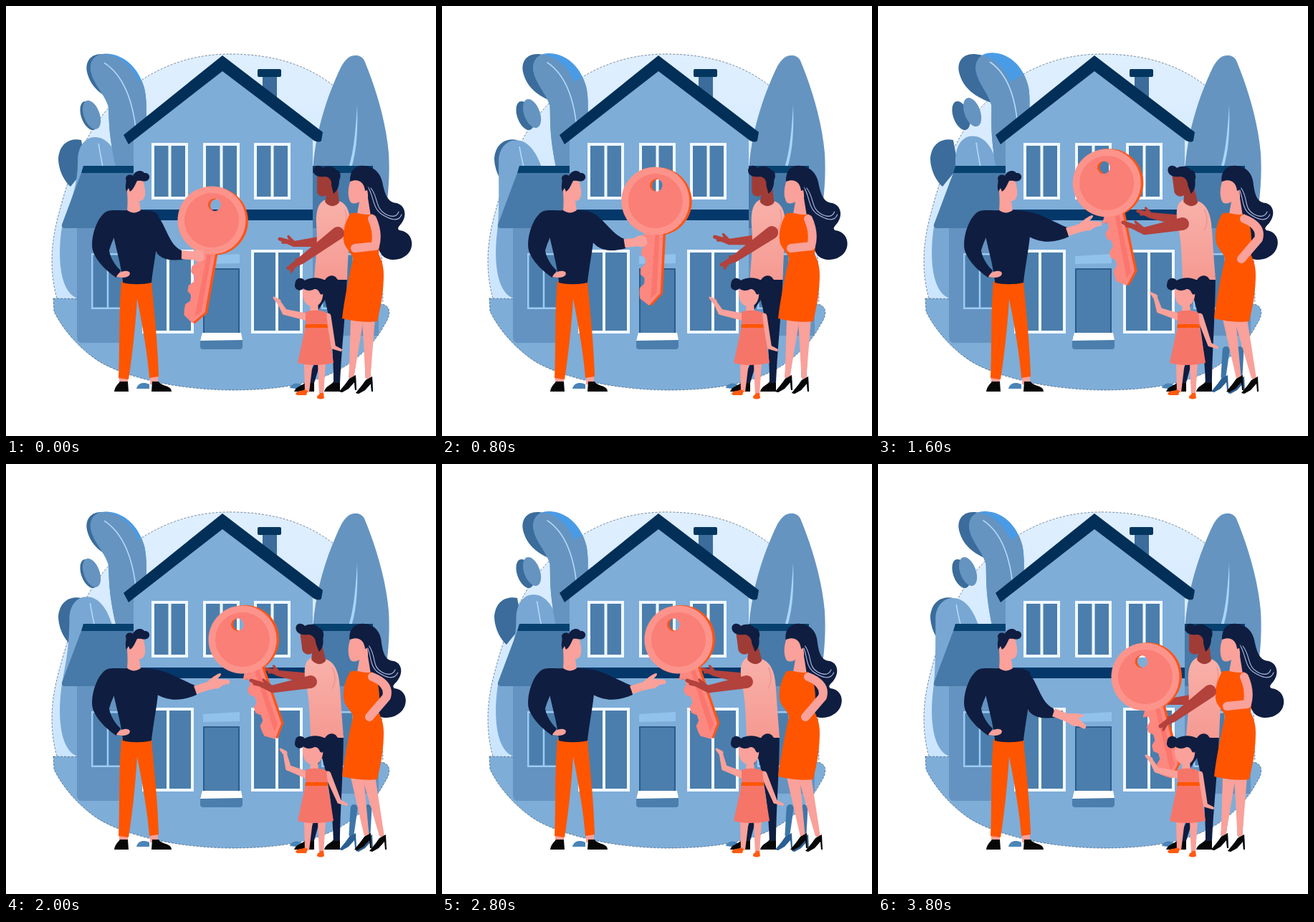
An HTML page that plays this animation: 600x600 px, repeating every 4000 ms.

```html
<!DOCTYPE html>
<html lang="en">
<head>
<meta charset="utf-8">
<title>Handing over the house key</title>
<style>
html,body{margin:0;width:100%;height:100%;overflow:hidden;background:#fff}
svg{display:block;width:100vw;height:100vh}
</style>
</head>
<body>
<svg id="stage" viewBox="0 0 600 600"></svg>
<script>
const LOOP = 4000, STEP = 200;
const navy = '#0f1d40', skin = '#f9a19a', orange = '#ff5500', brown = '#b3413c', darkBrown = '#a03c36', black = '#070707';
const wall = '#7eadd8', mid = '#6594c1', pane = '#4b7eac', deep = '#3b6c9b', roof = '#012f57';

const path = (d, fill, extra = '') => `<path d="${d}" fill="${fill}" ${extra}/>`;
const line = (d, color, w) => path(d, 'none', `stroke="${color}" stroke-width="${w}" stroke-linecap="round" stroke-linejoin="round"`);
const rect = (x, y, w, h, fill, extra = '') => `<rect x="${x}" y="${y}" width="${w}" height="${h}" fill="${fill}" ${extra}/>`;
const oval = (x, y, rx, ry, fill, extra = '') => `<ellipse cx="${x}" cy="${y}" rx="${rx}" ry="${ry}" fill="${fill}" ${extra}/>`;
const part = (id, fill) => `<path id="${id}" fill="${fill}"/>`;
const group = (id, body) => `<g id="${id}">${body}</g>`;

// Tapered limb with rounded ends
function limb(x1, y1, r1, x2, y2, r2) {
  const a = Math.atan2(y2 - y1, x2 - x1) + Math.PI / 2, c = Math.cos(a), s = Math.sin(a);
  return `M${x1 + c * r1},${y1 + s * r1}A${r1},${r1} 0 0 1 ${x1 - c * r1},${y1 - s * r1}` +
    `L${x2 - c * r2},${y2 - s * r2}A${r2},${r2} 0 0 1 ${x2 + c * r2},${y2 + s * r2}Z`;
}

const sash = (x, y, w, h, color = '#f0f8ff', t = 4) =>
  rect(x + t / 2, y + t / 2, w - t, h - t, pane, `stroke="${color}" stroke-width="${t}"`) +
  rect(x + w / 2 - t / 2, y, t, h, color);

const blob = 'M312,67C380,67 425,86 458,112C515,150 540,215 530,270C522,310 524,360 526,412L72,412C60,370 62,330 75,285C88,235 110,175 150,135C190,95 245,67 312,67Z';
const ground = 'M66,408L525,416C540,420 535,435 528,445C515,470 490,495 460,510C420,530 370,536 312,536C240,535 175,520 135,499C105,482 78,450 67,426Z';
const leaf = 'M135,67C118,66 110,78 113,92C117,110 132,122 138,140C140,158 138,175 150,225L185,225C192,180 194,140 188,115C180,88 160,68 135,67Z';
const edge = 'stroke="#28405c" stroke-width=".6" stroke-dasharray="3 2"';
const bud = fill => oval(116, 153, 11, 21, fill, 'transform="rotate(-20 116 153)"');

const scenery =
  path(blob, 'url(#sky)', edge) + path(ground, wall, edge) +
  path('M105,187C90,184 75,191 73,212C73,232 84,247 90,252L112,225Z', deep) +
  part('bush', '#78a7d3') + `<path id="vein" fill="none" stroke="#b5d9f8" stroke-width="1.6"/>` +
  path('M135,67C118,66 110,78 113,92C117,110 130,125 158,135L168,82Q152,68 135,67Z', deep) + bud(deep) +
  group('bright', path(leaf, '#4a9be6')) +
  `<g clip-path="url(#inside)">${group('leaf', path(leaf, mid) + line('M132,80C155,95 172,125 178,180', '#b5d9f8', 1.6))}</g>` +
  group('bud', bud(mid)) +
  path('M489,69C480,68 474,74 468,84C448,125 430,180 428,235L428,320L526,320C528,290 537,260 534,205C530,160 516,115 500,76C497,71 493,69 489,69Z', mid) +
  path('M490,138C488,170 486,200 478,226L482,226C490,200 491,170 490,138Z', '#a9d5fa');

const house =
  rect(358, 97, 20, 50, deep) + rect(351, 88, 33, 11, '#03365f', 'rx="2"') +
  path('M105,233H178V310H82Q77,310 78,305Z', '#477aa8') + path('M108,223H178V233H105Z', '#06416f') +
  path('M99,310H180V470H106Q99,470 99,462Z', '#6593c1') +
  path('M428,233H508L530,310H428Z', '#477aa8') + rect(428, 223, 84, 10, '#06416f') +
  rect(428, 310, 92, 150, '#6593c1') +
  [119, 440].map(x => sash(x, 345, 46, 78, '#9ccbf4', 2.5)).join('') +
  path('M178,180L303,85L428,180V470H178Z', wall) + rect(178, 284, 250, 15, '#05386a') +
  path('M302,69L442,176L440,188Q437,191 430,188L302,91L171,193L164,180Z', roof) +
  [203, 275, 346].map(x => sash(x, 191, 51, 79)).join('') +
  [190, 342].map(x => sash(x, 340, 72, 117)).join('') +
  path('M275,349L326,346V359L275,360Z', '#91c2ec') +
  rect(275, 366, 51, 94, pane) + line('M276,460V367H325V456', '#2a5c8c', 2) +
  rect(271, 462, 59, 17, pane, 'rx="4"') + path('M274,456H328L330,466L271,467Z', '#fff');

const man =
  path('M182,534C184,526 192,524 200,528V534Z', '#4a84b8') +
  path('M158,516H170V528H158ZM201,514H212V528H201Z', skin) +
  path('M161,384H203C206,420 212,470 213,517L200,519C197,480 189,440 183,408C181,445 176,490 171,521L157,519C159,475 157,425 161,384Z', orange) +
  path('M151,538C152,531 156,528 159,524H170L171,538ZM203,538L204,524H213C217,531 231,529 231,538Z', black) +
  path('M170,244C167,255 171,263 169,286C175,291 183,290 188,286L186,272C192,272 195,267 194,256L191,240Z', skin) +
  path('M168,259C165,250 169,246 167,241C167,236 173,234 177,237C180,229 190,228 193,233C199,232 202,238 199,242C195,247 188,243 183,244C180,249 179,255 173,259L171,254Z', navy) +
  path('M142,286C150,284 160,286 169,285C176,290 182,289 188,285C196,286 205,284 212,291C216,315 207,350 203,386C190,389 175,389 163,386C161,360 152,335 148,310Z', navy) +
  path('M142,286C128,291 117,323 121,341C126,357 142,371 154,379L160,369C152,362 145,350 144,341C147,330 152,320 157,310Z', navy) +
  path('M154,378C157,370 167,368 172,371C175,375 170,379 163,379Z', skin);

const shoes =
  path('M396,533C398,526 408,524 414,530V535Z', '#4a84b8') +
  path('M402,538C405,530 414,530 418,525H430V538ZM444,538C446,530 454,529 457,524H466V538Z', black);

const trousers =
  path('M430,500L418,526H430L438,500Z', navy) +
  path('M432,376H476C474,430 468,480 466,526H457C457,480 453,440 445,410L432,430Z', navy);

const torso =
  path('M446,270C436,274 432,285 433,305C435,330 433,345 430,382H476C477,350 479,330 480,303C480,285 474,274 464,272Z', 'url(#shirt)') +
  line('M473,284Q478,300 469,313', '#e98f88', 1) +
  path('M434,236V260C436,266 442,267 447,264L445,273C450,281 460,281 465,274L462,250L455,236Z', darkBrown) +
  path('M429,231C428,223 437,220 442,226C449,222 458,224 461,229C467,229 468,238 465,243C465,252 462,258 457,262L454,250C455,243 451,239 446,238C439,239 430,238 429,231Z', navy);

const pump = 'M-3,2L6,-3L7,18L5,18L4,7L-4,16L-13,21L-17,20L-8,9Z';
const sides = ['L', 'R'];
const legPair = (id, leg, shoe) => sides.map(s => part(id + s, leg) + group(id + 'Shoe' + s, path(pump, shoe))).join('');

const hair =
  path('M481,245C478,228 490,221 500,223C515,224 524,235 526,250C530,268 535,274 545,275C557,278 560,292 552,303C548,308 545,310 549,313C566,315 570,332 563,343C555,355 535,358 525,348C515,335 512,315 508,292C503,280 500,265 498,250C492,243 488,240 481,245Z', navy) +
  line('M503,250C514,262 510,282 525,291C536,298 548,302 552,291M509,254C520,268 515,282 529,290C536,294 545,296 548,287', '#aebce6', 1.1);

const woman = group('hair', hair) +
  path('M481,243C476,256 477,268 481,274C486,277 490,275 493,273L490,290L509,293L505,268C506,258 501,246 496,241Z', skin) +
  path('M480,245C479,233 489,224 499,230L506,256L501,258C500,246 492,240 480,245Z', navy) +
  path('M480,290C474,300 467,320 473,334C478,342 484,348 484,353C478,380 472,410 469,436C485,440 505,442 518,440C524,415 527,395 527,375C527,362 524,355 520,346C522,325 522,305 511,290C502,294 488,286 480,290Z', orange) +
  `<path id="arm" fill="none" stroke="${skin}" stroke-width="12" stroke-linecap="round" stroke-linejoin="round"/>`;

const disc = r => `M${-r},0A${r},${r} 0 1 1 ${r},0A${r},${r} 0 1 1 ${-r},0ZM-9,-22A9,9 0 1 0 9,-22A9,9 0 1 0 -9,-22Z`;
const round = (r, fill) => path(disc(r), fill, 'fill-rule="evenodd"');
// Three teeth of the same cut
const teeth = [130, 103, 76].map(y => `L-16,${y}V${y - 8}L-10,${y - 14}V${y - 22}`).join('');
const shaft = `M13,40V128L-2,146L-15,137${teeth}L-18,54L-10,40Z`;
const key =
  `<g transform="translate(3.500 .5)">${path(shaft, '#ff5418')}${round(47.5, '#ff5418')}</g>` +
  path(shaft, '#fd8880') + path('M2,45H8V128L0,136Z', '#fb766e') +
  round(47.5, '#fc948c') + round(38, '#fa7f77');

const child =
  part('kidRight', skin) +
  path('M416,498H428L423,539H417ZM435,498H446L443,544H437Z', skin) +
  path('M404,541C407,535 414,538 417,535L421,537L419,543H406ZM434,547C434,541 439,543 438,540H443L444,547Q439,550 434,547Z', '#ff5a10') +
  part('kidLeft', skin) + path('M425,412H435L436,428H424Z', skin) +
  path('M418,427C425,424 440,424 447,428L449,447L457,498C440,502 420,502 407,498L418,447Z', '#f67569') +
  path('M418,444H448L449,449H417Z', orange) +
  path('M414,396C413,410 418,419 429,420C438,419 444,410 442,394L430,388Z', skin) +
  path('M404,384C407,378 414,379 417,383C425,378 438,378 445,383C448,375 459,374 462,381C469,384 468,395 461,397C453,400 446,397 445,395C444,401 441,405 438,401C436,396 434,395 430,395C424,399 416,396 415,394C410,400 402,395 403,389Z', navy);

const stops = (a, b) => `<stop stop-color="${a}"/><stop offset="1" stop-color="${b}"/>`;
document.getElementById('stage').innerHTML =
  `<defs><linearGradient id="sky" x2="0" y2="1">${stops('#dfefff', '#cbe5ff')}</linearGradient>
  <linearGradient id="shirt" x2="0" y2="1">${stops('#f8b1a9', '#f59a92')}</linearGradient>
  <clipPath id="inside"><path d="${blob}"/><path d="${leaf}"/></clipPath></defs>` +
  scenery + house + man + shoes + legPair('shade', '#3f76a8', '#2b5f92') +
  part('farArm', brown) + group('trousers', trousers) + group('torso', torso) +
  legPair('leg', skin, black) + woman + group('key', key) + part('sleeve', navy) +
  group('hand',
    group('palm', path('M-1,-6L18,-5C26,-8 34,-11 40,-10C42,-8 38,-6 33,-4L47,2Q50,5 47,8L38,7L30,9C24,7 18,6 -1,6Z', skin)) +
    group('fist', path('M-1,-6L14,-5C20,-9 27,-8 30,-4L31,5C28,10 21,10 17,7L-1,6Z', skin))) +
  part('nearArm', brown) + child;

const set = (id, attr, value) => document.getElementById(id).setAttribute(attr, value);
const shape = (id, d) => set(id, 'd', d);
const move = (id, value) => set(id, 'transform', value);
const show = (id, on) => set(id, 'visibility', on ? 'visible' : 'hidden');
// Horizontal slant about the height y
const slant = (id, k, y) => move(id, `matrix(1 0 ${k} 1 ${-k * y} 0)`);

const ramp = (t, from, to) => Math.min(1, Math.max(0, (t - from) / (to - from)));
const ease = (t, from, to) => { const p = ramp(t, from, to); return p * p * (3 - 2 * p); };
const pulse = (t, up, upEnd, down, downEnd) => ease(t, up, upEnd) - ease(t, down, downEnd);
const wave = (t, peak, period) => Math.cos(2 * Math.PI * (t - peak) / period);
const mix = (a, b, p) => a.map((v, i) => v + (b[i] - v) * p);

function placeLegs(id, feet, top = 436, r = 9) {
  sides.forEach((s, i) => {
    const hip = 490 + 16 * i, blend = (top - 436) / 81;
    shape(id + s, limb(hip + (feet[i] - hip) * blend, top, r, feet[i], 517, 3.5));
    move(id + 'Shoe' + s, `translate(${feet[i]} ${518 + 2 * i})`);
  });
}

// Forearm from elbow to wrist, then fingers and thumb towards the tip
function reach(id, [ex, ey, wx, wy, tx, ty], r) {
  const [mx, my] = mix([wx, wy], [tx, ty], .5);
  shape(id, limb(ex, ey, r, wx, wy, r * .58) + limb(wx, wy, r * .58, tx, ty, 2.5) +
    limb(wx, wy, 3.5, mx + 2, my - 7, 1.7) + limb(mx, my, 3, tx + 4, ty + 5, 1.7));
}

function drawPlants(t) {
  const s = 15 + 16 * wave(t, 1300, 2000), x = 92.5 + 15.5 * wave(t, 1600, 1370);
  for (const id of ['bright', 'leaf']) move(id, `matrix(1 0 ${-s / 350} 1 ${s * 1.23} ${-s * .07})`);
  move('bud', `translate(${s * .64} ${-s * .2})`);
  const y = 203 - x * .2;
  shape('bush', `M100,408C76,400 72,355 77,315C80,290 ${x},265 ${x},216C${x},${y + 13} ${x + 10},${y} ${x + 24},${y}C${x + 42},${y} ${x + 53},${y + 18} ${x + 60},225H178V408Z`);
  shape('vein', `M${x + 29},${y + 9}Q${x + 31},${y + 22} ${x + 35},225`);
}

function draw(t) {
  drawPlants(t);
  const give = ramp(t, 400, 2000), back = ease(t, 2800, 3600);
  const rise = 1 - (1 - give) ** 2.4;
  move('key', `translate(${287 + 43 * (give + back)} ${299 - 54 * rise + 52 * back}) rotate(${10 - 29 * give + 4 * back})`);

  const lift = pulse(t, 400, 1200, 2900, 3700);
  const [x, y] = mix([246, 347], [265, 315], lift), dip = 6 + 9 * lift;
  shape('sleeve', `M196,286C222,285 ${x - 24},${y - 15} ${x - 1},${y - 6}L${x + 1},${y + 7}C${x - 24},${y + dip + 3} ${x - 42},${y + dip} 204,318Z`);
  move('hand', `translate(${x} ${y}) rotate(${2 - 22 * lift + 17 * back})`);
  show('palm', give > .7);
  show('fist', give <= .7);

  const lean = pulse(t, 700, 1300, 2800, 3600);
  slant('torso', .129 * lean, 419);
  slant('trousers', .033 * lean, 530);
  reach('nearArm', mix([463, 317, 412, 355, 394, 366], [425, 304, 372, 314, 342, 302], lean), 9);
  reach('farArm', mix([436, 329, 402, 332, 382, 325], [414, 298, 380, 292, 363, 286], lean), 7);

  const turn = pulse(t, 900, 1600, 2800, 3600);
  slant('hair', -.08 * lean, 225);
  const [ex, ey, hx, hy] = mix([515, 335, 487, 338], [531, 325, 507, 353], turn);
  shape('arm', `M511,297Q${ex + 5},${ey - 18} ${ex},${ey}L${hx},${hy}`);
  placeLegs('leg', mix([482, 505], [503, 524], turn));

  const wish = pulse(t, 1200, 1800, 3200, 3600);
  const [ax, ay, bx, by, cx, cy, dx, dy] = mix([374, 407, 389, 427, 457, 476, 467, 480], [383, 398, 394, 424, 465, 471, 475, 475], wish);
  shape('kidLeft', limb(420, 434, 5, bx, by, 4) + limb(bx, by, 4, ax + 6, ay + 5, 2.6) + limb(ax + 6, ay + 5, 3.4, ax, ay, 1.5));
  shape('kidRight', limb(449, 433, 4.5, cx, cy, 3) + limb(cx, cy, 3, dx, dy, 2));
}

placeLegs('shade', [482, 505], 480, 5);
const start = performance.now();
function tick() {
  const t = (performance.now() - start) % LOOP;
  draw(Math.floor(t / STEP) * STEP);
  requestAnimationFrame(tick);
}
tick();
</script>
</body>
</html>
```
